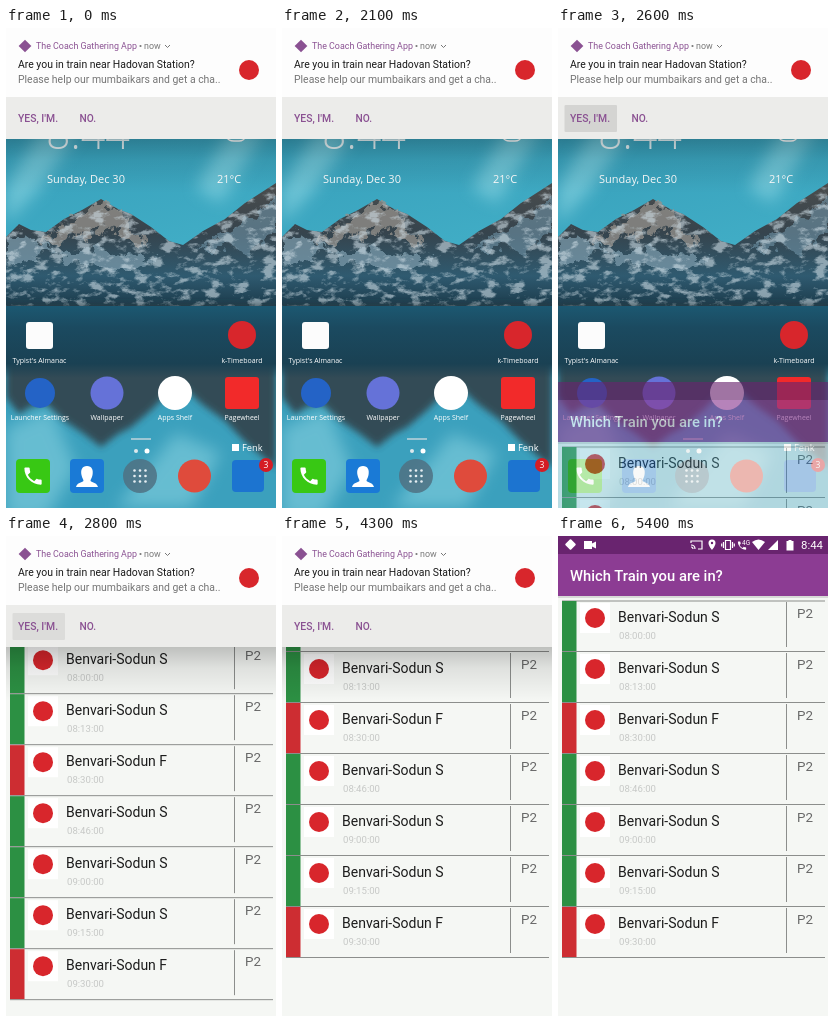
Write an HTML page that moves like this. It is 270x480 px and loops after 8 s.

```html
<!DOCTYPE html>
<html lang="en">
<head>
<meta charset="utf-8">
<style>
  html, body { margin: 0; width: 100%; height: 100%; overflow: hidden; background: #f5f7f4; }
  svg { display: block; width: 100vw; height: 100vh; font-family: Roboto, sans-serif; }
  .home { font-family: "Open Sans", sans-serif; fill: #fff; }
  .mid { text-anchor: middle; }
</style>
</head>
<body>
<svg viewBox="0 0 270 480" preserveAspectRatio="none">
  <defs>
    <linearGradient id="sky" x1="0" y1="0" x2=".2" y2="1">
      <stop offset="0" stop-color="#2f95b2"/>
      <stop offset="1" stop-color="#43b0c8"/>
    </linearGradient>
    <linearGradient id="rock" x1="0" y1="0" x2="0" y2="1">
      <stop offset="0" stop-color="#4b4d4d"/>
      <stop offset=".4" stop-color="#36444d"/>
      <stop offset=".75" stop-color="#2f5a70"/>
      <stop offset="1" stop-color="#1b3a4a"/>
    </linearGradient>
    <linearGradient id="deep" x1="0" y1="0" x2="0" y2="1">
      <stop offset="0" stop-color="#1c5871"/>
      <stop offset=".3" stop-color="#1b4a60"/>
      <stop offset=".8" stop-color="#1a4153"/>
      <stop offset="1" stop-color="#1a4153" stop-opacity="0"/>
    </linearGradient>
    <linearGradient id="shade" x1="0" y1="0" x2="0" y2="1">
      <stop offset="0" stop-opacity=".23"/>
      <stop offset=".4" stop-opacity=".09"/>
      <stop offset="1" stop-opacity="0"/>
    </linearGradient>
    <filter id="soft" x="-50%" y="-50%" width="200%" height="200%"><feGaussianBlur stdDeviation="8"/></filter>
    <filter id="haze"><feGaussianBlur stdDeviation="3"/></filter>
    <filter id="rough">
      <feTurbulence type="fractalNoise" baseFrequency=".09" numOctaves="4" seed="4"/>
      <feDisplacementMap in="SourceGraphic" scale="22" xChannelSelector="R" yChannelSelector="G"/>
    </filter>
    <filter id="snow" x="0" y="0" width="1" height="1">
      <feTurbulence type="fractalNoise" baseFrequency=".07 .13" numOctaves="5" seed="9"/>
      <feColorMatrix values="0 0 0 0 .62  0 0 0 0 .72  0 0 0 0 .78  5 0 0 0 -2.5"/>
      <feComposite operator="in" in2="SourceAlpha"/>
    </filter>
    <path id="handset" d="M6.6 10.8c1.4 2.8 3.8 5.1 6.6 6.6l2.2-2.2c.3-.3.7-.4 1-.2 1.1.4 2.3.6 3.6.6.6 0 1 .4 1 1V20c0 .6-.4 1-1 1C10.6 21 3 13.4 3 4c0-.6.4-1 1-1h3.5c.6 0 1 .4 1 1 0 1.2.2 2.4.6 3.6.1.3 0 .7-.3 1z"/>
    <path id="ridge" d="M0 209l13-13 12 6 15 2 18-13 18-9 19-11 17 10 13 5 20 13 18 14 14 4 20-14 22-12 20-16 31-20v124H0z"/>
  </defs>
  <g id="home" class="home"></g>
  <g id="app"></g>
  <g id="status"></g>
  <g id="note"></g>
</svg>
<script>
const $ = id => document.getElementById(id);
const text = (x, y, size, fill, str, more = '') =>
  `<text x="${x}" y="${y}" font-size="${size}" fill="${fill}" ${more}>${str}</text>`;
const rect = (x, y, w, h, fill, more = '') =>
  `<rect x="${x}" y="${y}" width="${w}" height="${h}" fill="${fill}" ${more}/>`;
const dot = (x, y, r, fill, more = '') =>
  `<circle cx="${x}" cy="${y}" r="${r}" fill="${fill}" ${more}/>`;
const path = (d, more = '') => `<path d="${d}" ${more}/>`;
const clamp = v => Math.max(0, Math.min(1, v));

const RED = '#d8262c', PURPLE = '#8a5192', LINE = '#8c8e8c';

function wallpaper() {
  const glow = 'fill="#9ce0ea" filter="url(#soft)"';
  return rect(0, 0, 270, 280, 'url(#sky)') +
    path('M75 100L30 165 0 195V160L35 100zM225 100l-35 60 25 15 45-75z', glow + ' opacity=".5"') +
    '<use href="#ridge" fill="url(#rock)"/>' +
    '<g filter="url(#rough)">' +
    path('M95 173l-18 10-25 15-16 18 22 2 14-14 8 10 12-19 6 16 8-17 14 18 24 8-24-30z', 'fill="#95928d" opacity=".75"') +
    path('M0 214l18-8 16 10 14 4-20 12-28 5zM52 228l30-8 30 8 40 4-28 10-50-4z', 'fill="#7f9fae" opacity=".7"') +
    path('M270 172l-25 20-27 14-25 18 30-6 18 8 29-22z', 'fill="#6f93a5" opacity=".6"') +
    '</g>' +
    '<use href="#ridge" filter="url(#snow)" opacity=".6"/>' +
    rect(0, 278, 270, 202, '#3ba0bd') +
    path('M0 400l45-20 25 60-30 50H0zM110 480l60-75 45 20-30 55z', glow + ' opacity=".45"') +
    '<use href="#ridge" transform="translate(0 643) scale(1 -1.31)" fill="#303c44" opacity=".85" filter="url(#haze)"/>' +
    rect(0, 278, 270, 72, 'url(#deep)');
}

function homeScreen() {
  const label = (x, y, str) => text(x, y, 7, '#fff', str, 'class="mid"');
  let dots = '';
  for (let i = 0; i < 9; i++) dots += dot(128.5 + i % 3 * 5.5, 442.5 + (i / 3 | 0) * 5.5, 1.3, '#e6eef2');
  return wallpaper() +
    text(40, 121, 43, '#fff', '8:44', 'font-weight="300" opacity=".85"') +
    path('M221 109q1 4 7 4h5q5 0 6-4', 'fill="none" stroke="#fff" stroke-width="1.3"') +
    text(41, 155, 11, '#fff', 'Sunday, Dec 30') + text(211, 155, 11, '#fff', '21°C') +
    rect(20, 294, 27, 27, '#fcfcfc', 'rx="3"') + label(33.5, 335, "Typist's Almanac") +
    dot(236, 307, 14, RED) + label(236, 335, 'k-Timeboard') +
    dot(34, 365, 15, '#2463c6') + label(34, 392, 'Launcher Settings') +
    dot(101, 365, 16.5, '#6572d8') + label(101, 392, 'Wallpaper') +
    dot(169, 365, 17, '#fff') + label(169, 392, 'Apps Shelf') +
    rect(219, 349, 34, 32, '#f22a2a', 'rx="3"') + label(236, 392, 'Pagewheel') +
    rect(125, 410, 20, 2, '#c8d8de', 'opacity=".7"') +
    dot(130, 423, 2, '#dce8ec') + dot(141, 423, 2.5, '#fff') +
    rect(226, 416, 7, 7, '#fff') + text(236, 423, 9.3, '#fff', 'Fenk') +
    rect(10, 431, 34, 34, '#38c814', 'rx="4"') +
    '<use href="#handset" transform="translate(15.5 436.5) scale(.96)" fill="#fff"/>' +
    rect(64, 431, 34, 34, '#1a7ad6', 'rx="4"') +
    path('M81 438c-5 0-6.5 4-5.5 9 .5 3 2 4 2 6-3 2-6.500 2-7.500 6h22c-1-4-4.500-4-7.500-6 0-2 1.500-3 2-6 1-5-.5-9-5.500-9z') +
    dot(134, 448, 17, '#4f7183', 'opacity=".85"') + dots +
    dot(188.5, 448, 16.5, '#df4b3c') +
    rect(226, 432, 32, 32, '#1c74d0', 'rx="4"') +
    dot(260, 437, 7, '#d51c24') + text(260, 440.2, 8.5, '#fff', '3', 'class="mid"');
}

function row([time, kind], i) {
  const y = 65 + 51 * i;
  return rect(4, y, 14.5, 50, kind === 'F' ? '#cd2d32' : '#2c9043') +
    rect(22, y + 2, 30, 30, '#fff') + dot(37, y + 17, 10, RED) +
    text(60, y + 21, 14, '#1c1c1c', 'Benvari-Sodun ' + kind) +
    text(61, y + 37.5, 9.6, '#c6c8c6', time) +
    rect(228, y + 1, 1, 45, LINE) + text(239, y + 17, 13.4, '#686868', 'P2') +
    rect(4, y + 50, 263, 1, LINE);
}

function trainList() {
  const trains = ['08:00:00 S', '08:13:00 S', '08:30:00 F', '08:46:00 S', '09:00:00 S', '09:15:00 S', '09:30:00 F'];
  return rect(0, 0, 270, 480, '#f5f7f4') + rect(0, 0, 270, 18, '#69246f') +
    rect(0, 18, 270, 42, '#8c3c93') + rect(0, 60, 270, 2, '#000', 'opacity=".12"') +
    text(12, 44.5, 14.8, '#fff', 'Which Train you are in?', 'font-weight="500"') +
    rect(4, 64.5, 263, 1, LINE) + trains.map(s => s.split(' ')).map(row).join('');
}

function statusBar() {
  const stroke = 'fill="none" stroke="#fff" stroke-width="1.2"';
  return rect(0, 0, 270, 18, '#69246f') + '<g fill="#fff">' +
    rect(8.5, 4.5, 8, 8, '#fff', 'rx="1" transform="rotate(45 12.5 8.5)"') +
    path('M26 5h8v2.5l4-2v7l-4-2V13h-8z') +
    path('M133 7V5h11v8h-4M133 9q4 0 4 4M133 11q2 0 2 2', stroke) +
    path('M154 3.5a3.5 3.5 0 0 0-3.5 3.5c0 3 3.5 7 3.5 7s3.5-4 3.5-7a3.5 3.5 0 0 0-3.5-3.5zm0 2.300a1.200 1.200 0 1 1 0 2.400 1.200 1.200 0 0 1 0-2.400z') +
    path('M167.5 4.5h5v9h-5zM165.500 6v6M174.500 6v6M163.700 7.500v3M176.300 7.500v3', stroke) +
    '<use href="#handset" transform="translate(178.5 4) scale(.46)"/>' +
    text(184, 8.5, 6.5, '#fff', '4G') +
    path('M194 6q6.500-5 13 0l-6.500 8z') + path('M220 4v10h-10z') +
    path('M228.500 5h2V4h3v1h2v9.500h-7z') + '</g>' +
    text(243, 13, 11.4, '#fff', '8:44');
}

function notification() {
  return rect(0, 110, 270, 55, 'url(#shade)') +
    rect(0, 0, 270, 70, '#fdfdfd') + rect(0, 69, 270, 42, '#ececea') +
    rect(14.5, 13.5, 9, 9, PURPLE, 'transform="rotate(45 19 18)"') +
    text(30, 21, 8.9, PURPLE, 'The Coach Gathering App') +
    dot(134.5, 18, 1.1, '#777') + text(138, 21, 8.9, '#777', 'now') +
    path('M159 17l2.5 2.5 2.5-2.5', 'fill="none" stroke="#777"') +
    text(12, 39.5, 10.45, '#1a1a1a', 'Are you in train near Hadovan Station?') +
    text(12, 54.5, 10.45, '#757575', 'Please help our mumbaikars and get a cha..') +
    dot(243, 42, 10, RED) +
    rect(6.5, 77, 52.5, 27, '#000', 'id="press" rx="1"') +
    text(12, 94, 10.4, PURPLE, "YES, I'M.", 'font-weight="500"') +
    text(73.5, 94, 10.2, PURPLE, 'NO.', 'font-weight="500"');
}

$('home').innerHTML = homeScreen();
$('app').innerHTML = trainList();
$('status').innerHTML = statusBar();
$('note').innerHTML = notification();

const move = (id, y) => $(id).setAttribute('transform', `translate(0 ${y})`);
const fade = (id, a) => $(id).setAttribute('opacity', a);

function draw(now) {
  const t = Math.floor(now % 8000 / 100) * 100;

  // list rises and fades in, settling exponentially
  const rise = 354 * Math.exp(-(t - 2600) / 94);
  move('app', t > 3100 ? 0 : Math.min(480, rise));
  fade('app', clamp((t - 2480) / 190));

  // button press
  fade('press', .1 * Math.min(clamp((t - 2200) / 200), clamp((3200 - t) / 600)));

  // notification leaves upwards
  const out = clamp((t - 4700) / 600);
  move('note', -170 * out * out * (3 - 2 * out));
  fade('status', t >= 4800 ? 1 : 0);
  requestAnimationFrame(draw);
}
requestAnimationFrame(draw);
</script>
</body>
</html>
```
